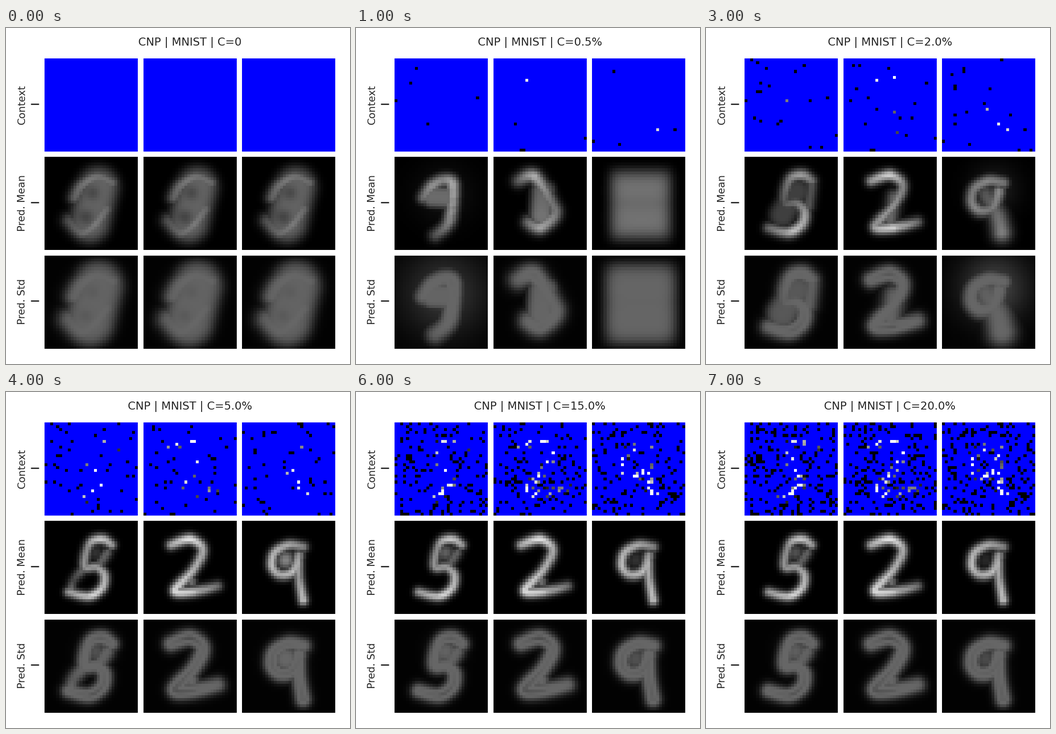
Write a matplotlib script that moves like this. It is 723x707 px and loops after 8 s.

```python
import numpy as np
import matplotlib.pyplot as plt
from matplotlib.animation import FuncAnimation

W, H, DPI = 723, 707, 100
N = 32                                  # cells per image side
LEFT, TOP, SIDE, STEP = 81.2, 64.2, 195.6, 207.4
INK = "#262626"
PERCENT = [0, 0.5, 1, 2, 5, 10, 15, 20]
COUNTS = [int(N * N * p / 100) for p in PERCENT]

GX, GY = np.meshgrid(np.arange(N) + 0.5, np.arange(N) + 0.5)


def spline(points, n=10):
    """Catmull-Rom samples through (x, y) points."""
    p = np.array(points, float)
    p = np.vstack([p[0], p, p[-1]])
    t = np.linspace(0, 1, n)[:, None]
    parts = [p[:1]]
    for a, b, c, d in zip(p, p[1:], p[2:], p[3:]):
        parts.append(b + 0.5 * t * (c - a + t * (2 * a - 5 * b + 4 * c - d
                                                 + t * (3 * (b - c) + d - a))))
    return np.vstack(parts)


def stroke(points, width, *light, power=2):
    """Soft brush stroke; the light values are spread along its length."""
    s = spline(points)
    at = np.linspace(0, len(light) - 1, len(s))
    glow = np.interp(at, range(len(light)), light)
    dist = np.hypot(GX[..., None] - s[:, 0], GY[..., None] - s[:, 1])
    return (glow * np.exp(-(dist / width) ** power)).max(axis=-1)


def paint(*layers):
    return np.clip(np.max(layers, axis=0), 0, 1)


def spread(mean):
    """Predictive deviation: widest where the mean is undecided."""
    return 0.01 + 0.75 * np.sqrt(mean * (1.05 - mean))


def halfway(a, b):
    return [(p + q) / 2 for p, q in zip(a, b)]


FIVE = [(23, 8.3), (20, 6.3), (16, 7.3), (14, 12), (14, 16), (18, 16),
        (20.6, 19), (19.5, 23.4), (15, 26), (8.3, 24.5)]
TWO = [(9.5, 8.3), (16, 6.3), (20.3, 10), (17, 17), (10.8, 24), (17, 24.4),
       (25.5, 22.4)]
LOOP = [(21, 9), (16, 8.3), (11.3, 11), (10.3, 15.5), (13, 18.5), (17.5, 17.4),
        (19.5, 12)]
TAIL = [(19.2, 14), (19.6, 20), (21, 27.3)]
TOP_FILL = [(17.5, 11)]
LOOP_FILL = [(15, 13.5)]


def blur():
    """Average digit predicted without any context."""
    holes = (stroke([(16.5, 12.4)], 2.5, 0.1)
             + stroke([(14.2, 20.8)], 2.6, 0.12))
    rim = [(10.5, 14), (13, 10), (18, 7), (23, 9)]
    base = [(8.5, 22), (13, 26), (17.5, 23), (21, 18)]
    return paint(stroke([(18.5, 10.5), (15.5, 22.5)], 7.2, 0.39, power=4),
                 stroke(rim, 2.6, 0.38, 0.48, 0.42),
                 stroke(base, 2.8, 0.3, 0.42, 0.5, 0.42)) - holes


def hazy():
    hook = [(10, 14), (13, 10), (17, 8), (20, 10), (18.8, 22), (14, 27)]
    curl = [(8.5, 8.3), (14, 6.8), (20, 16), (21, 20), (16, 24.3), (12, 22.5)]
    block = ((GX - 16.7) / 10.8) ** 6 + ((GY - 16.6) / 12.2) ** 6
    waist = 0.03 * np.exp(-((GY - 16) / 3) ** 2)
    return [
        paint(stroke(hook, 2.4, 0.42, 0.58, 0.52, 0.68, 0.54, 0.32),
              stroke([(13, 13.7), (18, 14)], 4, 0.42, power=4),
              stroke([(17, 13)], 10, 0.07)),
        paint(stroke(curl, 2.5, 0.3, 0.7, 0.45, 0.48, 0.66, 0.42),
              stroke([(17, 12), (16.5, 20)], 4.3, 0.38, 0.45, power=4)),
        (0.45 - waist) * np.exp(-block),
    ]


def forming():
    return [
        paint(stroke(FIVE, 2.1, 0.45, 0.63, 0.45, 0.34, 0.48, 0.64, 0.75, 0.4),
              stroke([(18, 12), (13, 20)], 4.8, 0.25, power=4),
              stroke([(23, 10), (22, 17)], 2.2, 0.33)),
        paint(stroke(TWO, 2, 0.55, 0.84, 0.5, 0.58, 0.6, 0.85, 0.4),
              stroke([(17.5, 14), (16, 22)], 2.8, 0.4)),
        paint(stroke(LOOP, 2.3, 0.46, 0.53, 0.48, 0.53, 0.47, 0.55),
              stroke([(15, 13), (19, 20), (20.5, 26)], 3.5, 0.33, 0.5),
              stroke([(18, 11)], 8, 0.12)),
    ]


def settled(glow, top_fill, loop_fill):
    return [
        paint(stroke(FIVE, 1.8, 0.6, 0.8, 0.55, 0.58, 0.62, 0.7, 0.84, 0.6),
              stroke(TOP_FILL, 3.2, top_fill),
              stroke([(21.5, 11), (18.5, 15.5)], 1.9, 0.38)),
        paint(stroke(TWO, 1.9, 0.62, 0.92, 0.66, 0.7, 0.88, 0.8, 0.42),
              stroke([(16.5, 21)], 2, 0.45)),
        paint(stroke(LOOP, 1.9, 0.5, 0.66, 0.7, 0.74, 0.66, 0.74, 0.6),
              stroke(TAIL, 1.8, 0.72, glow, 0.77),
              stroke(LOOP_FILL, 3.4, loop_fill)),
    ]


clear = settled(0.58, 0.2, 0.52)
clear[0] = paint(clear[0], stroke([(9, 24), (10, 20.5), (13, 17)], 1.8, 0.5, 0.25, 0.4))
sharp, final = settled(0.68, 0.44, 0.24), settled(0.64, 0.32, 0.16)
soft, rough = hazy(), forming()
means = [[blur()] * 3, soft, halfway(soft, rough), rough,
         clear, sharp, halfway(sharp, final), final]

# True digits behind the context points
true_five = [(24.5, 8.6), (18, 6.4), (15.2, 9), (16, 12), (15.6, 14),
             (19.3, 20.5), (17.3, 23.3), (12.5, 26.6), (8, 25.5)]
digits = [
    stroke(true_five, 1.35, 0.5, 1, 1, 1, 1, 0.4, power=3),
    stroke(TWO, 1.35, 0.9, 1, 1, 1, 1, 0.4, power=3),
    paint(stroke(LOOP, 1.3, 0.4, 1, 1, 1, 1, 1, power=3),
          stroke(TAIL, 1.3, 1, power=3),
          stroke([(22.5, 24.5)], 0.6, 0.85)),
]

# First revealed cells as (column, row)
first_cells = [
    [(7, 3), (5, 8), (0, 14), (28, 13), (11, 22), (5, 21), (17, 4), (14, 14)],
    [(11, 7), (7, 22), (31, 27), (9, 31), (10, 31), (17, 6), (17, 18), (18, 25)],
    [(7, 4), (22, 24), (28, 24), (0, 28), (9, 29), (8, 18), (15, 17), (19, 22)],
]


def reveal_order(digit, cells, seed):
    """Listed cells, then background up to 2 %, then anything."""
    known = [r * N + c for c, r in cells]
    rest = [i for i in np.random.default_rng(seed).permutation(N * N)
            if i not in known]
    dark = [i for i in rest if digit.flat[i] < 0.05][:COUNTS[3] - len(known)]
    return np.array(known + dark + [i for i in rest if i not in dark])


orders = [reveal_order(d, c, s) for s, (d, c) in enumerate(zip(digits, first_cells))]


def context(col, count):
    rgb = np.tile([0.0, 0.0, 1.0], (N * N, 1))
    shown = orders[col][:count]
    value = digits[col].ravel()[shown]
    rgb[shown] = np.where(value < 0.05, 0, value)[:, None]
    return rgb.reshape(N, N, 3)


def gray(img):
    return np.repeat(np.clip(img, 0, 1)[..., None], 3, axis=2)


plt.rcParams["font.family"] = "DejaVu Sans"
fig = plt.figure(figsize=(W / DPI, H / DPI), dpi=DPI, facecolor="white")
ax = fig.add_axes([0, 0, 1, 1])

panels = []
for row in range(3):
    y = TOP + row * STEP
    panels.append([])
    for col in range(3):
        x = LEFT + col * STEP
        panels[row].append(ax.imshow(
            np.zeros((N, N, 3)), extent=(x, x + SIDE, y + SIDE, y),
            interpolation="nearest", aspect="auto"))

for row, label in enumerate(["Context", "Pred. Mean", "Pred. Std"]):
    tick = 160 + row * 207.2
    ax.text(39.5, tick + 1.2, label, fontsize=15.4, color=INK, rotation=90,
            rotation_mode="anchor", ha="center", va="baseline")
    ax.plot([52.3, 69.3], [tick, tick], color=INK, lw=2, solid_capstyle="butt")

title = ax.text(386.4, 37, "", fontsize=16.8, color=INK, ha="center", va="baseline")
ax.set_xlim(0, W)
ax.set_ylim(H, 0)
ax.axis("off")


def update(i):
    share = f"{PERCENT[i]:.1f}%" if PERCENT[i] else "0"
    title.set_text(f"CNP | MNIST | C={share}")
    for col in range(3):
        mean = np.clip(means[i][col], 0, 1)
        panels[0][col].set_data(context(col, COUNTS[i]))
        panels[1][col].set_data(gray(mean))
        panels[2][col].set_data(gray(spread(mean)))
    return [title, *sum(panels, [])]


anim = FuncAnimation(fig, update, frames=len(PERCENT), interval=1000,
                     repeat=True, repeat_delay=0, blit=False)
plt.show()
```
